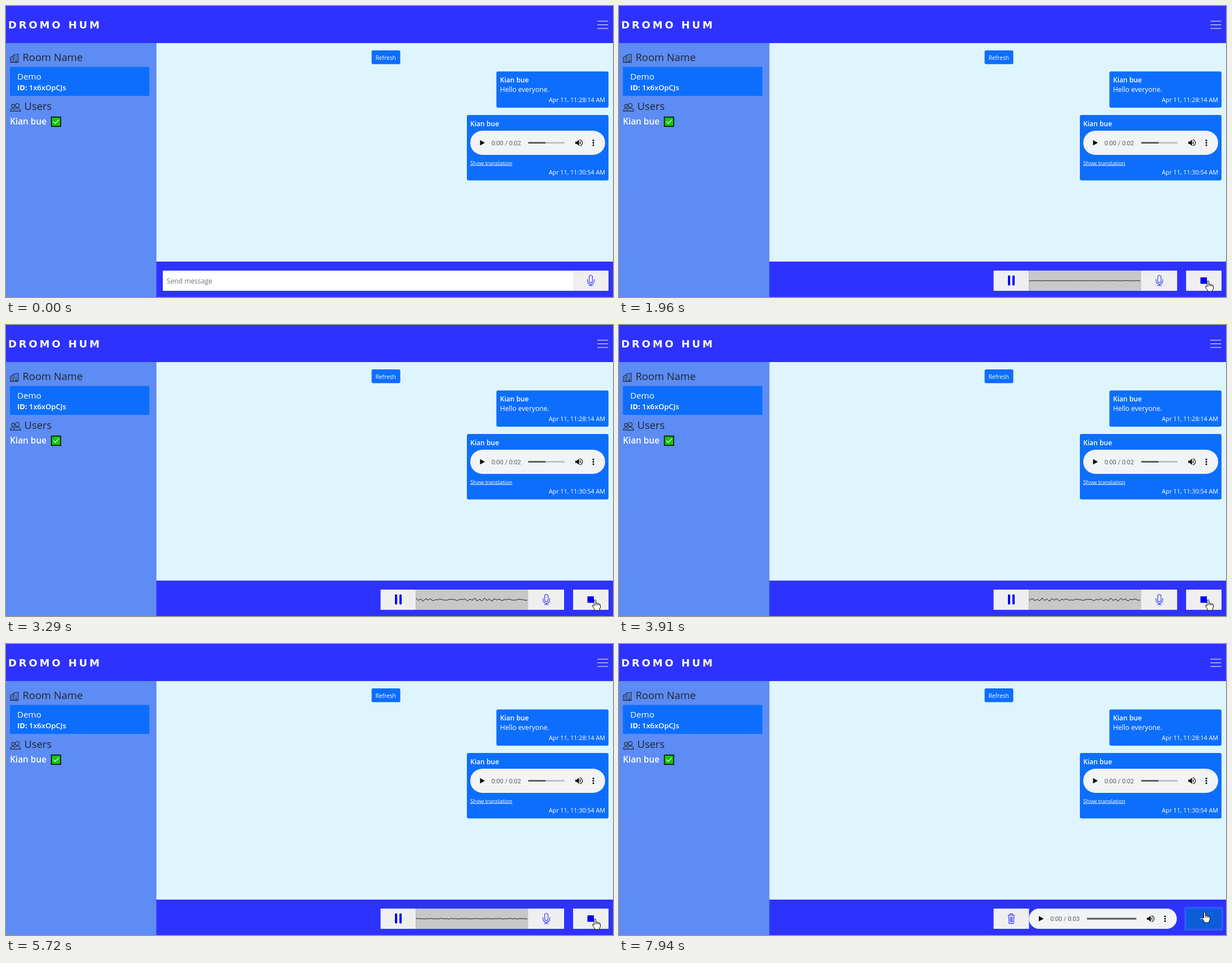
These frames come from a looping animation (1080x518 px, 8000 ms). An HTML page:

```html
<!DOCTYPE html>
<html lang="en">
<head>
<meta charset="utf-8">
<title>Group chat</title>
<style>
  html, body { margin: 0; height: 100%; overflow: hidden; background: #2e32ff; }
  svg { display: block; width: 100vw; height: 100vh; font: 12.1px "Open Sans", "Noto Sans", sans-serif; }
  text { fill: #fff; white-space: pre; }
  .bold { font-weight: 600; }
  .head { font-size: 18.4px; fill: #212529; }
  .end { font-size: 10.75px; text-anchor: end; }
  .clock { font: 11px Roboto, Arial, sans-serif; fill: #5a5c5f; }
  .logo { font: bold 18px "DejaVu Sans", sans-serif; letter-spacing: 3.9px; }
  .line { fill: none; stroke-width: 1.1; stroke-linecap: round; stroke-linejoin: round; }
</style>
</head>
<body>
<svg id="stage" viewBox="0 0 1080 518" preserveAspectRatio="none"></svg>
<script>
const LOOP = 8000, USER = 'Kian bue', BLUE = '#0d6efd', INK = '#2e2eff';
const stage = document.getElementById('stage');

const rect = (x, y, w, h, fill, r = 0, more = '') =>
  `<rect x="${x}" y="${y}" width="${w}" height="${h}" rx="${r}" fill="${fill}" ${more}/>`;
const text = (x, y, s, cls = '', more = '') => `<text x="${x}" y="${y}" class="${cls}" ${more}>${s}</text>`;
const line = (d, color, more = '') => `<path class="line" d="${d}" stroke="${color}" ${more}/>`;
const at = (x, y, s) => `<g transform="translate(${x} ${y})">${s}</g>`;
const group = (id, s) => `<g id="${id}">${s}</g>`;

// Audio control; `done` is the dark part of its track
const player = (x, y, w, h, time, done) => at(x, y + h / 2,
  rect(0, -h / 2, w, h, '#f1f3f4', h / 2) +
  '<path d="M17.5-4.7V4.7L26 0Z"/>' +
  text(37.7, 4, time, 'clock') +
  rect(103, -1.6, w - 175, 3.2, '#bfc1c3', 1) +
  rect(103, -1.6, (w - 175) * done, 3.2, '#5b5d5f', 1) +
  at(w - 47, 0, '<path d="M-6-2H-3.2L.5-5.6V5.6L-3.2 2H-6ZM2-3Q5.2 0 2 3Z"/>' +
    line('M2.2-5.2C8-3.6 8 3.6 2.2 5.2', '#000', 'stroke-width="1.4"')) +
  [-4.2, 0, 4.2].map(cy => `<circle cx="${w - 21}" cy="${cy}" r="1.5"/>`).join(''));

const mic = (x, y) => at(x, y,
  line('M-3-6a3 3 0 0 1 6 0V1a3 3 0 0 1-6 0ZM-6-1.6V1a6 6 0 0 0 12 0V-1.6M0 7.2V9.2M-3.4 9.2H3.4', INK));

const building = at(7, 85, line(
  'M.8 15.4V6.2L6 4V15.4M6 15.4V2.6L14.8.8V15.4H.8M10 15.4V12H12V15.4' +
  'M8.4 5H9M11.8 4.5H12.4M8.4 7.4H9M11.8 7.4H12.4M8.4 9.8H9M11.8 9.8H12.4M3 8.4H3.6M3 10.8H3.6M3 13.2H3.6', '#212529'));

const people = at(7, 172.5, line(
  'M9.6 4.4a3.4 3.4 0 1 0 6.8 0a3.4 3.4 0 1 0-6.8 0M7 14.6C7 7.6 19 7.6 19 14.6Z' +
  'M2.8 5.4a2.8 2.8 0 1 0 5.6 0a2.8 2.8 0 1 0-5.6 0M5.6 14.6H.8C.6 11 3.4 9.6 7 10', '#212529'));

const trash = at(698, 489, line(
  'M-6-6.2H6M-2.4-6.4V-8.6H2.4V-6.4M-4.9-6L-4 8.6H4L4.9-6M-2-3.4L-1.7 6M0-3.4V6M2-3.4L1.7 6', INK));

const background =
  rect(0, 0, 1080, 518, '#2e32ff') +
  rect(0, 66, 267.5, 452, '#5c8cf4') +
  rect(267.5, 66, 812.5, 389, '#dff5fd') +
  text(4, 39.7, 'DROMO HUM', 'logo') +
  line('M1052.5 27H1071M1052.5 33.5H1071M1052.5 40H1071', '#fff', 'stroke-width="1.4"') +
  building + text(29.5, 98, 'Room Name', 'head') +
  rect(7, 108.5, 248, 51.5, BLUE) +
  text(20, 131, 'Demo', '', 'font-size="15.2" font-weight="500"') +
  text(20, 150, '<tspan font-weight="700">ID:</tspan> 1x6xOpCJs', 'bold', 'font-size="13"') +
  people + text(32.5, 185, 'Users', 'head') +
  text(7, 211, USER, 'bold', 'font-size="15.4"') +
  rect(80.7, 197.7, 16.6, 16.6, '#16c60c', 0, 'stroke="#000" stroke-width="1.5"') +
  line('M84.5 206.2L87.6 209.2L93.7 202.8', '#fff', 'stroke-width="1.6"') +
  rect(650.5, 79, 51, 24.5, BLUE, 2.5) + text(657.5, 95.6, 'Refresh', '', 'font-size="10.2"') +
  rect(872.5, 116.5, 199.5, 64.5, BLUE, 3) +
  text(879, 136, USER, 'bold') + text(879, 153.3, 'Hello everyone.') +
  text(1066, 171, 'Apr 11, 11:28:14 AM', 'end') +
  rect(820, 194, 252, 116.5, BLUE, 3) +
  text(826, 213.5, USER, 'bold') +
  player(826, 222, 240, 43, '0:00 / 0:02', .48) +
  text(826, 282.5, 'Show translation', '', 'font-size="9.6" text-decoration="underline"') +
  text(1066, 300.3, 'Apr 11, 11:30:54 AM', 'end');

const compose = group('compose',
  rect(279, 471, 730, 36, '#fff') + rect(1009, 471, 63, 36, '#efefef') +
  text(286, 494, 'Send message', '', 'style="fill:#6c757d"') + mic(1040.5, 488.5));

const record = group('record',
  rect(666.5, 471, 63, 36, '#efefef') + rect(692, 479.5, 4, 18, '#00f', 1.5) + rect(700, 479.5, 4, 18, '#00f', 1.5) +
  group('scope', rect(729.5, 471, 199.5, 36, '#c8c8c8') +
    '<path id="wave" fill="none" stroke="#000" stroke-width=".9"/>') +
  rect(929, 471, 64, 36, '#efefef') + mic(961.5, 488.5) +
  rect(1009, 471, 63, 36, '#efefef') + rect(1034.5, 483, 11.5, 11.5, '#00f'));

const review = group('review',
  rect(666.5, 471, 63, 36, '#efefef') + trash +
  player(729.5, 471, 263, 36, '0:00 / 0:03', 1) +
  rect(1006, 468, 69, 42, '#2f5bfe', 3, 'id="ring"') +
  rect(1009, 471, 63, 36, BLUE, 0, 'id="send"') +
  line('M1034.5 489H1046.5M1042.5 485L1046.5 489L1042.5 493', '#fff'));

const pointer = '<circle id="click" cx="1049.2" cy="489.5" r="8.6" fill="#ffe232" opacity=".75"/>' +
  group('hand', `<path fill="#fff" stroke="#000" d="M-1.5 1Q0-.8 1.5 1V6.4Q3.2 5.4 4.4 7Q6 6.2 7.2 7.8Q9 7.4 9.5 9.4V13
    Q9.4 15 8 16.8V19H-.2Q-.8 16.6-2.6 14.4L-4.5 11.4Q-4.6 9-2.6 9.8L-1.5 11ZM1.5 6.4V10M4.4 7V10M7.2 7.8V10.4"/>`);

stage.innerHTML = background + compose + record + review + pointer;

const el = id => document.getElementById(id);
const show = (id, on) => el(id).setAttribute('display', on ? 'inline' : 'none');
const within = (t, a, b) => t >= a && t < b;
const ramp = (t, a, b) => Math.min(1, Math.max(0, (t - a) / (b - a)));

// Pointer stops: time, x, y
const path = [
  [260, 1066, 500], [330, 1059, 496], [400, 1053, 492], [470, 1048, 490], [670, 1048, 489],
  [7460, 1048, 488], [7530, 1047, 487], [7600, 1047, 486],
  [7740, 1045, 482], [7810, 1043, 479], [7870, 1042, 478], [7940, 1042, 477]
];

function waveform(t) {
  const k = Math.floor((t - 1600) / 69.5);
  const loud = .3 + 1.1 * ramp(t, 2300, 2700) * (1 - ramp(t, 4900, 5200));
  const amp = k < 0 ? 0 : loud * (1 + .3 * Math.sin(k * 2.7));
  let d = '';
  for (let x = 0; x <= 199; x += 1.5) {
    const swell = .55 + .45 * Math.sin(x / 19 + k * 1.9);
    const y = Math.sin(x * .72 + k * 2.3) * swell + .5 * Math.sin(x * .31 + k * 4.1) + .35 * Math.sin(x * 1.57 + k * 5.3);
    d += `${d ? 'L' : 'M'}${729.5 + x} ${(489 + amp * y).toFixed(2)}`;
  }
  return d;
}

function draw(t) {
  show('compose', t < 1200);
  show('record', within(t, 1200, 5790));
  show('scope', t >= 1460);
  show('review', t >= 5790);
  show('click', within(t, 1070, 1200) || within(t, 5590, 5720) || within(t, 6580, 6870));
  if (within(t, 1460, 5790)) el('wave').setAttribute('d', waveform(t));

  const hover = ramp(t, 5790, 5920);
  el('send').setAttribute('fill', `rgb(${13 - 2 * hover},${110 - 16 * hover},${253 - 38 * hover})`);
  el('ring').setAttribute('opacity', ramp(t, 6560, 6720));

  const stop = path.filter(p => p[0] <= t).pop();
  show('hand', stop);
  if (stop) el('hand').setAttribute('transform', `translate(${stop[1]} ${stop[2]})`);
}

const start = performance.now();
function tick() {
  draw((performance.now() - start) % LOOP);
  requestAnimationFrame(tick);
}
tick();
</script>
</body>
</html>
```
